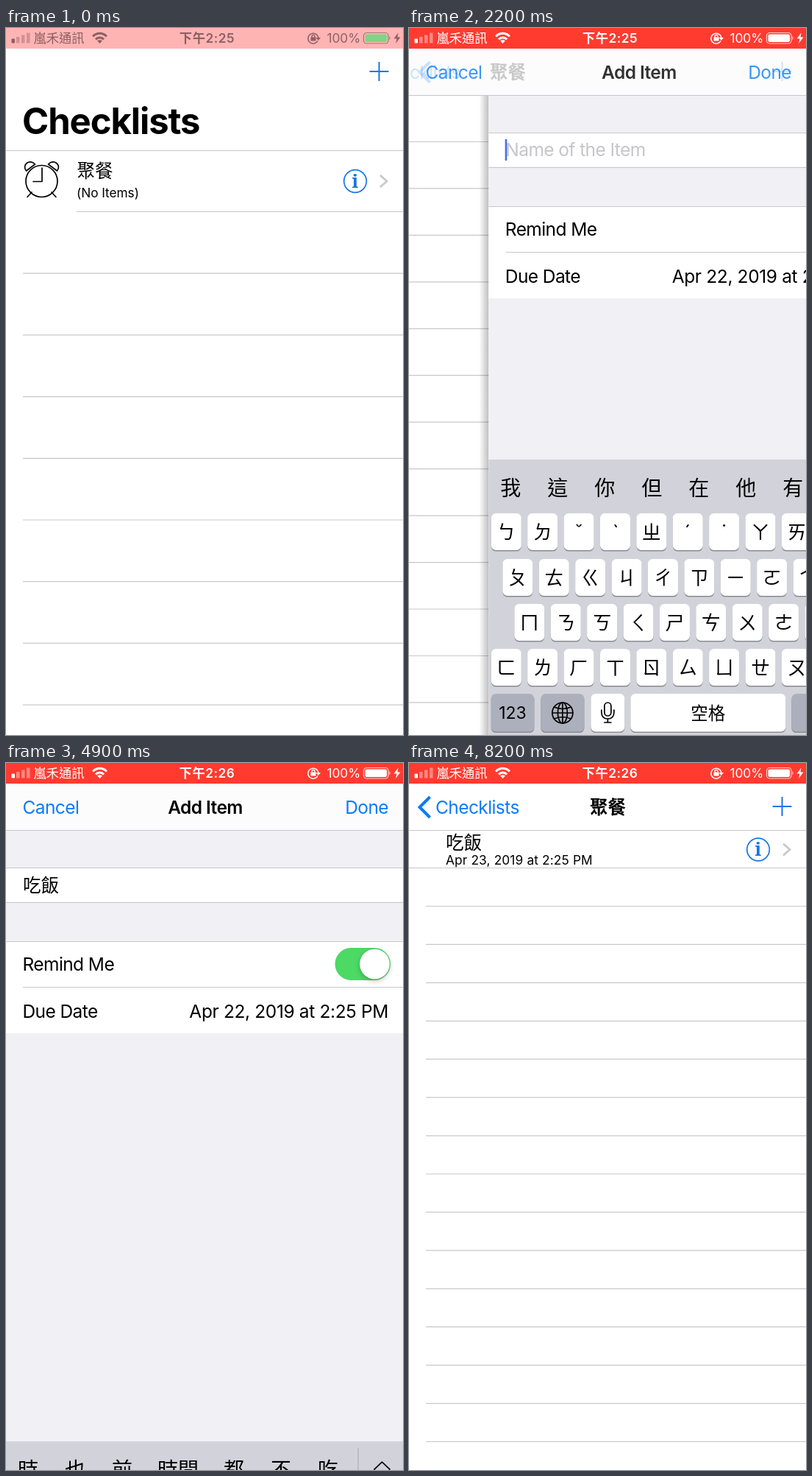
Write an HTML page that moves like this. It is 540x960 px and loops after 8600 ms.

```html
<!DOCTYPE html>
<html lang="zh-Hant">
<head>
<meta charset="utf-8">
<title>Checklists</title>
<style>
html, body { margin: 0; width: 100%; height: 100%; overflow: hidden; background: #fff; }
svg { display: block; width: 100vw; height: 100vh; font: 24.5px Inter, "Noto Sans CJK TC", sans-serif; }
text { letter-spacing: -.024em; white-space: pre; }
.cjk { letter-spacing: 0; }
.small { font-size: 17.3px; letter-spacing: -.004em; }
.date { letter-spacing: -.015em; }
.small.date { letter-spacing: .008em; }
.bold { font-weight: 600; }
.mid { text-anchor: middle; }
.end { text-anchor: end; }
.blue { fill: #0a7cf6; }
.line { fill: none; stroke: #c8c7cc; stroke-width: 1.2; }
.ink { fill: none; stroke: #000; stroke-width: 1.7; stroke-linecap: round; stroke-linejoin: round; }
.tint { fill: none; stroke: #1677e8; stroke-width: 2; }
.fg { fill: currentColor; }
.fgline { fill: none; stroke: currentColor; }
#status { --p: 100%; color: color-mix(in srgb, #fff var(--p), #8d6062); }
#bar { fill: color-mix(in srgb, #ff3b30 var(--p), #ffb4b4); }
#charge { fill: color-mix(in srgb, #fff var(--p), #80d486); }
#clock { letter-spacing: .03em; }
.key { fill: #fff; }
.key.grey { fill: #abb0bc; }
.base { fill: #8a8c92; }
.cap { font-size: 26px; text-anchor: middle; letter-spacing: 0; }
.word { font-size: 28px; text-anchor: middle; letter-spacing: 0; }
.wheel { font-size: 31px; letter-spacing: -.03em; font-feature-settings: "tnum"; }
#bubble { filter: drop-shadow(0 2px 4px #0004); }
#knob { stroke: #0000001a; filter: drop-shadow(0 3px 3px #0003); }
</style>
</head>
<body>
<svg id="stage" viewBox="0 0 540 960" preserveAspectRatio="none">
  <defs>
    <linearGradient id="shade"><stop stop-color="#000" stop-opacity="0"/><stop offset="1" stop-color="#000" stop-opacity=".25"/></linearGradient>
    <clipPath id="wordClip"><rect y="586" width="479" height="74"/></clipPath>
    <g id="accessory">
      <circle class="tint" cx="475" r="15.3" style="stroke-width:1.7"/>
      <text class="mid" x="475" y="8.5" fill="#1677e8" style="font:700 25px 'Noto Serif',serif;letter-spacing:0">i</text>
      <path d="M509 -8l9 8l-9 8" fill="none" stroke="#c7c7cc" stroke-width="2.7"/>
    </g>
    <rect id="edge" x="-13" width="13" height="960" fill="url(#shade)"/>
  </defs>

  <g id="home">
    <rect width="540" height="960" fill="#fff"/>
    <rect id="hit" y="166" width="540" height="83.5" fill="#d9d8db"/>
    <path id="homeLines" class="line"/>
    <g class="ink">
      <circle cx="48.5" cy="208" r="21.5"/>
      <path d="M49 190v18.5H37M35 223l-6 6.500M62 223l6 6.500M27.500 194C21 186 32 177 39.500 185ZM69.500 194C76 186 65 177 57.500 185Z"/>
    </g>
    <text class="cjk" x="96.500" y="203">聚餐</text>
    <text class="small" x="96" y="229.500">(No Items)</text>
    <use href="#accessory" y="208"/>
  </g>

  <g id="list">
    <use href="#edge"/>
    <rect width="540" height="960" fill="#fff"/>
    <path id="blank" class="line"/>
    <g id="filled">
      <path id="filledLines" class="line"/>
      <text class="cjk" x="50" y="116.500">吃飯</text>
      <text class="small date" x="50" y="138">Apr 23, 2019 at 2:25 PM</text>
      <use href="#accessory" y="117.500"/>
    </g>
  </g>

  <g id="add">
    <use href="#edge"/>
    <rect width="540" height="960" fill="#f0f0f5"/>
    <rect y="142" width="540" height="46.500" fill="#fff"/>
    <path class="line" d="M0 142.500H540"/>
    <text id="hint" x="23" y="174" fill="#c5c5cb">Name of the Item</text>
    <text id="entry" class="cjk" x="23" y="174.500"></text>
    <rect id="caret" y="151" width="2.600" height="29" fill="#4670e6"/>
    <g id="clear">
      <circle cx="498.500" cy="166" r="10.500" fill="#c0c0c6"/>
      <path d="M494.500 162l8 8m0-8l-8 8" stroke="#fff" stroke-width="2.200"/>
    </g>
    <g id="form">
      <rect id="sheet" y="242" width="540" fill="#fff"/>
      <path class="line" d="M0 189.500H540M0 242.500H540M23 304.500H540"/>
      <path id="sheetLines" class="line"/>
      <text x="22.500" y="282">Remind Me</text>
      <text x="22.500" y="345.500">Due Date</text>
      <text id="due" x="520" y="345.500"></text>
      <rect id="track" x="448.750" y="252.250" width="73" height="41.500" rx="20.750" stroke-width="2.500"/>
      <circle id="knob" cy="273" r="20.500" fill="#fff"/>
    </g>
    <g id="picker"></g>
    <g id="keyboard">
      <rect y="586" width="540" height="374" fill="#d2d3da"/>
      <g id="words" clip-path="url(#wordClip)"></g>
      <path d="M479 595v55" stroke="#b4b6be" stroke-width="1.500"/>
      <path class="ink" d="M501 624l10.500-10 10.500 10"/>
      <g id="keys"></g>
      <g class="ink">
        <circle cx="100.500" cy="930" r="14"/><ellipse cx="100.500" cy="930" rx="6.500" ry="14"/>
        <path d="M86.500 930h28M100.500 916v28M89 922q11.500 5 23 0M89 938q11.500-5 23 0"/>
        <rect x="157.500" y="916" width="9" height="18" rx="4.500"/>
        <path d="M153.500 926v3q0 9 8.500 9t8.500-9v-3M162 938v5M157.500 943h9"/>
        <path d="M507 869l7-8h13q2.500 0 2.500 2.500v11q0 2.500-2.500 2.500h-13ZM516.500 865.500l7 7m0-7l-7 7"/>
      </g>
      <g id="bubble"><path id="bubblePath" fill="#fff"/><text id="bubbleCap" class="mid cjk" style="font-size:51px"></text></g>
    </g>
  </g>

  <g id="nav">
    <rect id="navBg" width="540" fill="#fff"/>
    <path id="navLine" class="line"/>
    <g id="morph">
      <text id="big" class="bold" style="font-size:49px;font-weight:700;letter-spacing:-.022em">Checklists</text>
      <text id="backLabel" class="blue" style="font-size:49px">Checklists</text>
    </g>
    <path id="backMark" d="M28.500 46L14.500 60l14 14" fill="none" stroke="#0a7cf6" stroke-width="4"/>
    <text id="listTitle" class="mid cjk" x="270.500" y="68.500" font-weight="700">聚餐</text>
    <path id="plus" class="tint" d="M494.500 59h26M507.500 46v26"/>
    <text id="cancel" class="blue" x="22.500" y="68.500">Cancel</text>
    <text id="addTitle" class="mid bold" x="271" y="68.500">Add Item</text>
    <text id="done" class="blue end" x="520" y="68.500">Done</text>
  </g>

  <g id="status">
    <rect id="bar" width="540" height="28"/>
    <rect class="fg" x="7.500" y="14.500" width="4.500" height="6" rx="1"/>
    <path class="fg" opacity=".4" d="M14 12h4.500v8.500H14zM21 9.500h4.500v11H21zM28 6.500h4.500v14H28z"/>
    <text class="small cjk fg" x="37.500" y="20">嵐禾通訊</text>
    <path class="fgline" stroke-width="3" d="M118.200 11.500a12.500 12.500 0 0 1 18.600 0M122 15.500a7.500 7.500 0 0 1 11 0"/>
    <path class="fg" d="M127.500 21l-3.300-3.500a4.700 4.700 0 0 1 6.600 0z"/>
    <text id="clock" class="small mid bold fg" x="273.500" y="20"></text>
    <path class="fgline" stroke-width="1.500" d="M424 17.500a7 7 0 1 1 .8-4"/>
    <path class="fg" d="M421.500 13h6.500l-3.200 4zM414.500 12.500h7v5h-7z"/>
    <path class="fgline" stroke-width="1.300" d="M416 13v-1.500a2 2 0 0 1 4 0V13"/>
    <text class="small fg" x="436.500" y="20">100%</text>
    <rect class="fgline" x="486.500" y="6.500" width="33.500" height="14.500" rx="4" stroke-width="1.200" opacity=".75"/>
    <rect id="charge" x="488.500" y="8.500" width="29.500" height="10.500" rx="2"/>
    <path class="fg" d="M521.500 11q2 2.700 0 5.500z"/>
    <path class="fg" d="M533.500 6.500l-6 8h4l-1.500 6.500 6.500-8.500h-4z"/>
  </g>
</svg>
<script>
const LOOP = 8600, STEP = 100;
const $ = id => document.getElementById(id);
const mix = (a, b, p) => a + (b - a) * p;
const unit = v => Math.min(1, Math.max(0, v));
const ease = v => { v = unit(v); return v * v * (3 - 2 * v); };
const set = (id, attrs) => { for (const k in attrs) $(id).setAttribute(k, attrs[k]); };
const show = (id, on) => { $(id).style.display = on ? '' : 'none'; };
const fade = (id, o) => { $(id).style.opacity = o; };
const move = (id, x, y = 0) => set(id, { transform: `translate(${x} ${y})` });

// Critically damped slide used by every page change.
function slide(ms) {
  if (ms <= 0) return 0;
  if (ms > 520) return 1;
  const w = ms * .013;
  return 1 - (1 + w) * Math.exp(-w);
}

function rules(first, gap) {
  let d = '';
  for (let y = first; y < 960; y += gap) d += `M23 ${y.toFixed(1)}H540`;
  return d;
}
set('homeLines', { d: 'M96 249.5H540' + rules(333.2, 83.7) });
set('blank', { d: rules(154.5, 63.45) });
set('filledLines', { d: 'M0 142.5H540' + rules(194.5, 51.93) });

// Keyboard
const PITCH = 49.4;
const ROWS = [
  [3.4, 659, 'ㄅㄉˇˋㄓˊ˙ㄚㄞㄢㄦ'],
  [19, 721, 'ㄆㄊㄍㄐㄔㄗㄧㄛㄟㄣ'],
  [35, 782, 'ㄇㄋㄎㄑㄕㄘㄨㄜㄠㄤ'],
  [3.4, 843, 'ㄈㄌㄏㄒㄖㄙㄩㄝㄡㄥ']
];
function key(x, y, w, label = '', { grey = '', id = '', size = 26, h = 50 } = {}) {
  const box = `x="${x}" width="${w}" height="${h}" rx="6.5"`;
  return `<rect class="base" ${box} y="${y + 1.6}"/>
    <rect class="key ${grey}" ${box} y="${y}" ${id && `id="${id}"`}/>
    <text class="cap" x="${x + w / 2}" y="${y + h / 2 + size * .38}" style="font-size:${size}px" ${id && `id="${id}Cap"`}>${label}</text>`;
}
const grey = 'grey', h = 51.5;
$('keys').innerHTML =
  ROWS.map(([x, y, caps]) => [...caps].map((c, i) => key(x + i * PITCH, y, 41, c)).join('')).join('') +
  key(497.4, 843, 41.6, '', { grey }) +
  key(3.4, 904, 58.6, '123', { grey, h, size: 23 }) +
  key(71, 904, 59, '', { grey, h }) +
  key(139, 904, 46, '', { h }) +
  key(193, 904, 211, '空格', { h, id: 'space', size: 23.5 }) +
  key(412, 904, 127, '完成', { grey, h, id: 'enter', size: 23.5 });

function press(cap) {
  show('bubble', cap);
  if (!cap) return;
  const [start, k, caps] = ROWS.find(r => r[2].includes(cap));
  const x = start + caps.indexOf(cap) * PITCH, r = x + 41, L = Math.max(x - 19, 2), R = x + 60;
  set('bubblePath', { d: `M${L + 10} ${k - 103}H${R - 10}q10 0 10 10V${k - 20}C${R} ${k - 8} ${r} ${k - 8} ${r} ${k + 6}
    V${k + 45}q0 6-6 6H${x + 6}q-6 0-6-6V${k + 6}C${x} ${k - 8} ${L} ${k - 8} ${L} ${k - 20}V${k - 93}q0-10 10-10Z` });
  set('bubbleCap', { x: (L + R) / 2 - 1, y: k - 39 });
  $('bubbleCap').textContent = cap;
}

// Typing stages: start time, field text, suggestions
const STAGES = [
  [0, '', '我 這 你 但 在 他 有 是'],
  [3200, 'ㄔ', '吃 出 成 車 長 常 處 場'],
  [3500, 'ㄔㄈ', '吃飯 出發 充分 處罰 成分 廚房'],
  [3900, '吃飯', '時 也 前 時間 都 不 吃']
];
let shown = null;
function type(t) {
  const stage = STAGES.filter(s => s[0] <= t).pop();
  if (stage === shown) return;
  shown = stage;
  const [, text, words] = stage, ready = text === '吃飯', composing = text && !ready;
  let x = -2;
  $('words').innerHTML = words.split(' ').map(w => {
    const cell = 40 + 24 * w.length;
    x += cell;
    return `<text class="word" x="${x - cell / 2}" y="634.5">${w}</text>`;
  }).join('');
  $('entry').textContent = text;
  set('caret', { x: 22.3 + 24.5 * text.length });
  show('hint', !text);
  $('spaceCap').textContent = composing ? '選定' : '空格';
  $('enterCap').textContent = composing ? '確認' : '完成';
  $('enter').style.fill = ready ? '#067aff' : '';
  $('enterCap').style.fill = ready ? '#fff' : '#7b7f88';
}

// Date picker: each column is wrapped around a cylinder.
const DAYS = ['Sun', 'Mon', 'Tue', 'Wed', 'Thu', 'Fri', 'Sat'];
const COLUMNS = [
  { x: 234, end: true, label: i => i ? `${DAYS[(i + 8) % 7]} Apr ${22 + i}` : 'Today' },
  { x: 297, end: true, label: i => (i + 13) % 12 + 1 },
  { x: 385, end: true, label: i => 25 + i },
  { x: 424, label: i => ['AM', 'PM'][i + 1] || '' }
];
$('picker').innerHTML = '<path class="line" d="M0 499.5H540M0 548.5H540" opacity=".7"/>';
const items = COLUMNS.flatMap((col, c) => Array.from({ length: 11 }, (_, n) => {
  const el = document.createElementNS('http://www.w3.org/2000/svg', 'text');
  el.setAttribute('class', col.end ? 'wheel end' : 'wheel');
  el.textContent = col.label(n - 5);
  $('picker').append(el);
  return { el, c, i: n - 5, x: col.x };
}));
function spin(turn) {
  for (const { el, c, i, x } of items) {
    const d = i - (c ? 0 : turn), a = d * Math.PI / 9, far = Math.abs(d);
    el.style.display = far < 4.4 ? '' : 'none';
    const size = far < .5 ? 1.03 : .965 - far * .012;
    const y = 524 + 130 * Math.sin(a), squash = size * Math.max(.05, Math.cos(a));
    el.setAttribute('transform', `translate(${x} ${y}) scale(${size} ${squash}) translate(0 11.5)`);
    el.style.opacity = far < .5 ? .82 : Math.max(.08, .44 - far * .075);
  }
}

function render(t) {
  const open = slide(t - 970);
  const form = slide(t - 1970) * (1 - slide(t - 7470));
  const listed = 1 - form;

  // Status bar
  $('status').style.setProperty('--p', 100 * ease(t / 300) + '%');
  $('clock').textContent = t < 3500 ? '下午2:25' : '下午2:26';

  // Pages
  show('home', open < 1);
  show('list', open > 0 && form < 1);
  show('add', form > 0);
  show('hit', open > 0);
  move('home', -180 * open);
  move('list', 540 * (1 - open) - 180 * form);
  move('add', 540 * listed);
  show('blank', t < 5000);
  show('filled', t >= 5000);

  // Navigation bar
  const height = mix(167, 92, open), scale = mix(1, .5, open);
  set('navBg', { height, fill: form > .5 ? '#fcfcfd' : '#fff' });
  set('navLine', { d: `M0 ${height - .5}H540` });
  set('morph', { transform: `translate(${mix(22, 36, open) - 100 * form} ${mix(144, 68.5, open)}) scale(${scale})` });
  fade('big', 1 - open);
  fade('backLabel', open * listed);
  fade('backMark', open * listed);
  move('listTitle', 209 * (1 - open) - 170 * form);
  fade('listTitle', open * listed);
  fade('plus', t === 1900 ? .3 : listed);
  move('addTitle', 209 * listed);
  fade('addTitle', form);
  fade('cancel', form);
  fade('done', t >= 7300 ? form * .35 : form);

  // Entry and keyboard
  const typing = t < 4600;
  type(t);
  press(t === 3100 ? 'ㄔ' : t === 3400 ? 'ㄈ' : '');
  show('caret', typing);
  show('clear', typing && t >= 3200);
  const down = ease((t - 4500) / 500);
  show('keyboard', down < 1);
  move('keyboard', 0, 374 * down);

  // Reminder switch and date picker
  const on = ease((t - 4500) / 400), grow = ease((t - 5000) / 200);
  set('knob', { cx: mix(471, 501.5, on) });
  set('track', { fill: on > .4 ? '#4cd964' : '#fff', stroke: on > .4 ? '#4cd964' : '#e6e6e9' });
  move('form', 0, -grow);
  set('sheet', { height: 125 + 314 * grow });
  set('sheetLines', { d: grow ? `M23 367.5H540M0 ${367.5 + 314 * grow}H540` : '' });
  show('picker', grow > 0);
  fade('picker', unit((t - 5000) / 400));
  spin(t < 6500 ? .8 * ease((t - 6000) / 300) : .8 + .2 * ease((t - 6400) / 200));
  $('due').textContent = `Apr ${t < 6600 ? 22 : 23}, 2019 at 2:25 PM`;
  set('due', { class: grow > 0 ? 'date end blue' : 'date end' });
}

function tick() {
  render(Math.floor(performance.now() % LOOP / STEP) * STEP);
  requestAnimationFrame(tick);
}
tick();
</script>
</body>
</html>
```
